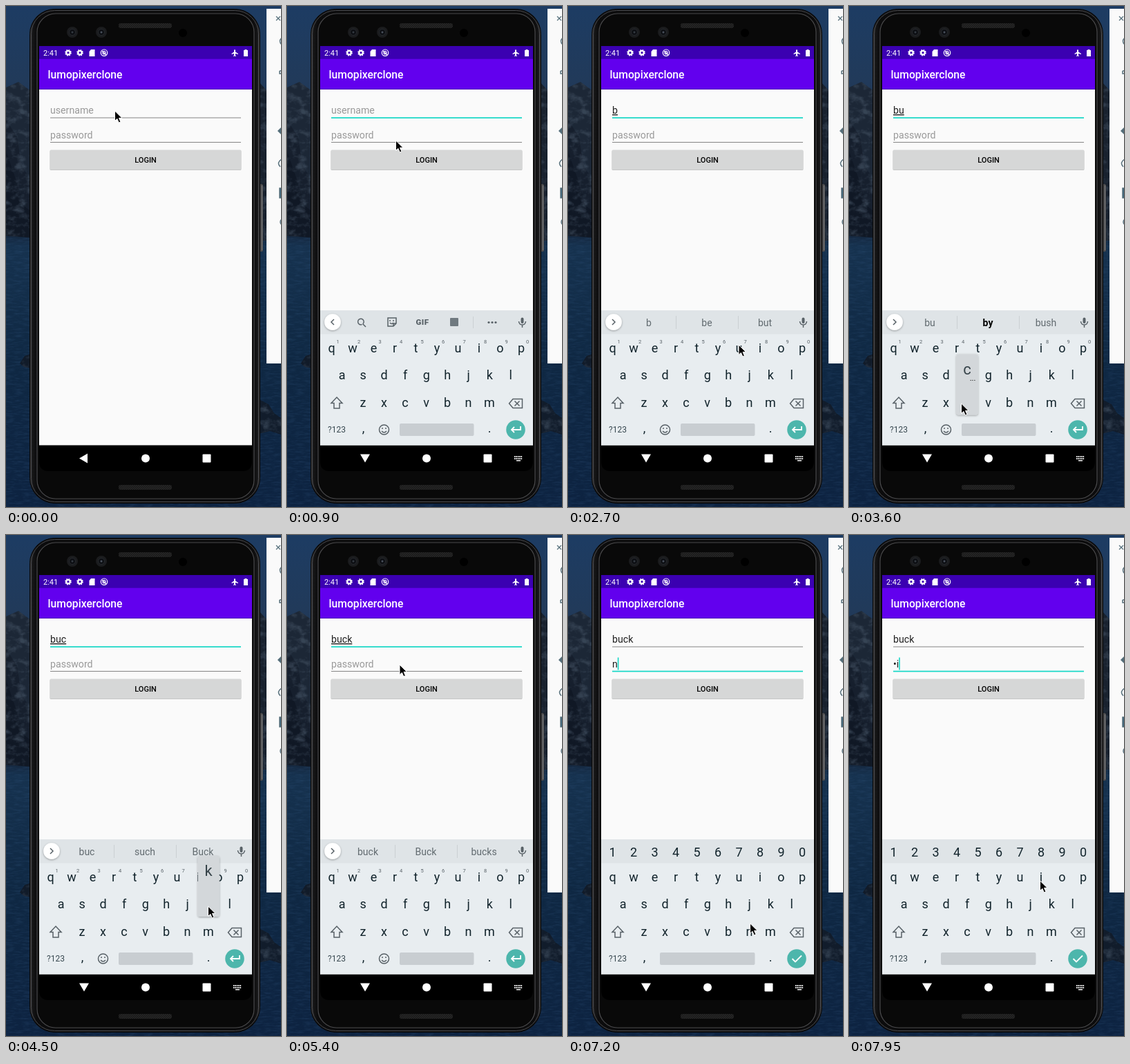
Write an HTML page that moves like this. It is 398 by 726 pixels and loops after 8000 ms.

```html
<!DOCTYPE html>
<html lang="en">
<head>
<meta charset="utf-8">
<title>Login form</title>
<style>
html, body { margin: 0; width: 100%; height: 100%; overflow: hidden; background: #14263f; }
svg { display: block; width: 100vw; height: 100vh; font-family: Roboto, sans-serif; }
.mid { text-anchor: middle; }
.key { font-size: 18px; fill: #12242c; text-anchor: middle; }
.field { font-size: 14.15px; }
.icon { fill: none; stroke: #586167; stroke-width: 1.5; }
</style>
</head>
<body>
<svg viewBox="0 0 398 726" preserveAspectRatio="none">
  <defs>
    <linearGradient id="sky" x2="0" y2="1">
      <stop stop-color="#1d3c63"/><stop offset=".15" stop-color="#213a5a"/>
      <stop offset=".45" stop-color="#15243a"/><stop offset=".48" stop-color="#16324f"/>
      <stop offset=".7" stop-color="#0f2843"/><stop offset="1" stop-color="#0d2341"/>
    </linearGradient>
    <linearGradient id="rim">
      <stop stop-color="#343436"/><stop offset=".012" stop-color="#161617"/>
      <stop offset=".03" stop-color="#0c0c0d"/><stop offset=".97" stop-color="#0c0c0d"/>
      <stop offset=".988" stop-color="#161617"/><stop offset="1" stop-color="#343436"/>
    </linearGradient>
    <pattern id="mesh" width="3" height="3" patternUnits="userSpaceOnUse">
      <rect width="3" height="3" fill="#262626"/><path d="M0 3L3 0" stroke="#151515"/>
    </pattern>
    <clipPath id="screen"><path d="M48 58H356V660Q356 674 342 674H62Q48 674 48 660Z"/></clipPath>
    <clipPath id="page"><path d="M48 121H356V636.400H48Z"/></clipPath>
    <filter id="shade" x="-30%" y="-30%" width="160%" height="160%">
      <feDropShadow dx="0" dy="1" stdDeviation="1.5" flood-opacity=".35"/>
    </filter>
    <filter id="rock" x="0" y="0" width="100%" height="100%" color-interpolation-filters="sRGB">
      <feTurbulence type="fractalNoise" baseFrequency=".07 .1" numOctaves="4" seed="4"/>
      <feColorMatrix values="0 0 0 0 .3  0 0 0 0 .36  0 0 0 0 .43  3 0 0 0 -1.4"/>
      <feComposite in2="SourceGraphic" operator="in"/>
    </filter>
    <filter id="waves" x="0" y="0" width="100%" height="100%" color-interpolation-filters="sRGB">
      <feTurbulence type="fractalNoise" baseFrequency=".08 .4" numOctaves="3" seed="9"/>
      <feColorMatrix values="0 0 0 0 .2  0 0 0 0 .34  0 0 0 0 .5  2 0 0 0 -.85"/>
    </filter>
    <g id="gear" fill="none" stroke="#fff">
      <circle r="2.7" stroke-width="2.2"/><circle r="4" stroke-width="1.6" stroke-dasharray="1.8 1.34"/>
    </g>
    <g id="land">
      <path d="M0 118L18 110 40 126V334L0 330Z" fill="#1c2736"/>
      <path d="M0 165L16 190 22 230 40 260V334L0 322Z" fill="#161f2d"/>
      <path d="M0 210L12 245 26 290 40 300V336L0 333Z" fill="#101825"/>
      <path d="M20 518L27 507 40 503V526L26 523Z" fill="#111b29"/>
      <path d="M366 110L377 122V340H366Z" fill="#18212e"/>
      <path d="M366 570L380 577 388 590 398 597V621L382 616 366 620Z" fill="#111c2b"/>
    </g>
  </defs>

  <rect width="398" height="726" fill="url(#sky)"/>
  <rect y="336" width="398" height="390" filter="url(#waves)" opacity=".3"/>
  <use href="#land"/>
  <use href="#land" filter="url(#rock)" opacity=".55"/>

  <rect x="367" y="258" width="5" height="98" rx="2" fill="#4a4a4c"/>
  <path d="M370.500 260V354" stroke="#77797c"/>
  <rect x="34.5" y="4.5" width="333" height="716" rx="36" fill="url(#rim)" stroke="#0a0a0a"/>
  <rect x="36.500" y="6.5" width="329" height="712" rx="34" fill="none" stroke="#4b4b4e"/>
  <rect x="45" y="11" width="314" height="703" rx="27" fill="#090909" stroke="#4a4a4c" stroke-width="1.2"/>
  <rect x="163" y="25" width="77" height="7" rx="3" fill="url(#mesh)"/>
  <rect x="163" y="694" width="77" height="7" rx="3" fill="url(#mesh)"/>
  <g fill="#1b1c1e">
    <circle cx="96" cy="38" r="8"/><circle cx="138" cy="38" r="8"/>
    <g fill="#0d0f13" stroke="#26292e"><circle cx="96" cy="38" r="4.5"/><circle cx="138" cy="38" r="4.5"/></g>
    <circle cx="256" cy="39" r="6" fill="#000"/>
    <circle cx="138" cy="38" r="1.5" fill="#49505c"/><circle cx="96" cy="38" r="1.5" fill="#343a42"/>
  </g>

  <path d="M377 4H398V518H377Z" fill="#fafafa"/>
  <g fill="none" stroke="#546e7a" stroke-width="1.5">
    <path d="M391 15L397 21M397 15L391 21" stroke-width="1.2"/>
    <path d="M399 46Q394 51 399 56M396 94H399M396 94V98H399M399 222Q391 227 397 233"/>
    <path d="M394 181L399 176V186Z" fill="#546e7a"/>
    <rect x="396" y="264" width="8" height="14" fill="#40677d"/>
    <circle cx="402" cy="313" r="5"/>
  </g>

  <g clip-path="url(#screen)">
    <path d="M48 121H356V637H48Z" fill="#fafafa"/>
    <path d="M48 76H356V120.700H48Z" fill="#6200ee"/>
    <path d="M48 58H356V76.800H48Z" fill="#3b00b1"/>
    <path d="M48 636.400H356V674H48Z"/>
    <g fill="#fff">
      <text id="clock" x="54" y="72" font-size="11"></text>
      <use href="#gear" x="90" y="67.700"/><use href="#gear" x="107" y="67.700"/>
      <path d="M123 63H128.500V73H120.500V66Z"/>
      <g fill="none" stroke="#fff" stroke-width="1.2"><circle cx="142" cy="67.700" r="4.7"/><circle cx="142" cy="67.700" r="2"/><path d="M139 65L145 71"/></g>
      <path d="M331 63Q332 63 332 64.500V66.500L336 69V70L332 69V71.500L333 72.500V73L331 72.500 329 73V72.500L330 71.500V69L326.500 70V69L330 66.500V64.500Q330 63 331 63Z"/>
      <path d="M345.500 63H348.500V64H350V73H344V64H345.500Z"/>
      <text x="60.500" y="105" font-size="15.7" font-weight="500">lumopixerclone</text>
      <circle cx="202" cy="655.500" r="6"/><rect x="284.500" y="649.500" width="12" height="12" rx="1"/>
    </g>
    <rect x="63.500" y="209.500" width="277" height="28.500" rx="1.500" fill="#c6c7c7"/>
    <rect x="63.500" y="208.500" width="277" height="28.500" rx="1.500" fill="#d6d7d7"/>
    <text class="mid" x="202" y="227" font-size="11" font-weight="500">LOGIN</text>
    <g id="live"></g>
  </g>
  <path id="pointer" d="M0 0V14.500L3.400 11.400 5.800 17 8.400 15.900 6 10.400H10.500Z" stroke="#fff"/>
</svg>

<script>
const LOOP = 8000, STEP = 150;
const $ = id => document.getElementById(id);
const pen = document.createElement('canvas').getContext('2d');

// time, x, y of the pointer tip
const path = [
  [0, 157.5, 152], [600, 157.5, 152], [900, 157.5, 195], [1200, 157.5, 195], [1750, 229, 577],
  [2100, 229, 577], [2650, 247, 491], [3000, 247, 491], [3300, 162.5, 576], [3750, 162.5, 576],
  [4300, 292.5, 538], [4700, 292.5, 538], [5400, 163, 188], [5850, 163, 188], [6150, 162.5, 282],
  [6800, 260, 580], [7050, 260, 580], [7550, 276.5, 501], [LOOP, 276.5, 501]
];
// time, username, suggestions
const typed = [
  [0, ''], [1950, 'b', 'b', 'be', 'but'], [3000, 'bu', 'bu', 'by', 'bush'],
  [3750, 'buc', 'buc', 'such', 'Buck'], [4650, 'buck', 'buck', 'Buck', 'bucks']
];
const secret = [[0, ''], [7050, 'n'], [7800, '•i']];
const presses = [['b', 1800, 1950], ['u', 2850, 3000], ['c', 3450, 3750],
  ['k', 4500, 4650], ['n', 6900, 7050], ['i', 7650, 7800]];
const FOCUS = 300, NEXT = 5850;

const keys = {};
[['qwertyuiop', 64.5, 501.5], ['asdfghjkl', 79.7, 541], ['zxcvbnm', 110, 580.5]].forEach(([row, x, y]) =>
  [...row].forEach((c, i) => keys[c] = [x + i * 30.5, y]));

const latest = (list, t) => list.filter(e => e[0] <= t).pop();
const text = (x, y, s, attrs = 'class="key"') => `<text x="${x}" y="${y}" ${attrs}>${s}</text>`;
const rect = (x, y, w, h, fill, more = '') =>
  `<rect x="${x}" y="${y}" width="${w}" height="${h}" fill="${fill}" ${more}/>`;
const icon = (d, more = '') => `<path class="icon" d="${d}" ${more}/>`;
const digits = draw => [...'1234567890'].map((d, i) => draw(d, 64.5 + i * 30.5)).join('');

function field(y, value, hint, focused, t, since) {
  let s = text(64, y, value || hint,
    `class="field" fill="${value ? '#212121' : '#999'}" ${value && focused && hint == 'username' ? 'text-decoration="underline"' : ''}`);
  s += focused ? rect(64, y + 5.2, 276, 1.7, '#14d7c6') : rect(64, y + 5.5, 276, 1, '#858585');
  if (focused && (t - since) % 1000 < 500) {
    pen.font = '14.15px Roboto, sans-serif';
    s += rect(64 + pen.measureText(value).width, y - 14, 1.6, 18, '#14d7c6');
  }
  return s;
}

function toolbar([, value, ...words]) {
  let s = '<circle cx="66" cy="458" r="11.800" fill="#fff" filter="url(#shade)"/>' +
    icon(value ? 'M64 454L68 458 64 462' : 'M68 454L64 458 68 462') +
    rect(338.5, 451.5, 4, 8.5, '#586167', 'rx="2"') +
    icon('M335.500 457Q336 462 340.500 462T345.500 457M340.500 462V466', 'stroke-width="1.2"');
  if (value) {
    words.forEach((w, i) => s += text(117 + 84 * i, 464, w, 'class="mid" font-size="14" ' +
      (value == 'bu' && i == 1 ? 'font-weight="700"' : 'fill="#626b70"')));
    return s + rect(156, 449, 1, 19, '#cbd0d3') + rect(246, 449, 1, 19, '#cbd0d3');
  }
  return s + icon('M110 460.500A4.300 4.300 0 1 0 108.500 461.500M109.500 460.500L114 465') +
    icon('M146 452H158V460L154 464H146ZM158 460H154V464M149 455V457M154 455V457M149 459Q151.500 462 154 459') +
    text(196, 462, 'GIF', 'class="mid" font-size="11.500" font-weight="900" fill="#586167" letter-spacing=".5"') +
    rect(236, 452, 12, 12, '#707a80', 'rx="1"') + rect(269, 450, 1, 17, '#cbd0d3') +
    [292, 297, 302].map(x => `<circle cx="${x}" cy="458.500" r="1.600" fill="#586167"/>`).join('');
}

function keyboard(t, entry) {
  const pass = t >= NEXT;
  let s = rect(48, 441, 308, 196, '#e8edf0') + rect(48, 441, 308, 34.5, '#dfe4e7');
  s += pass ? digits((d, x) => text(x, 465.5, d)) :
    toolbar(entry) + digits((d, x) => text(x + 9, 489, d, 'class="mid" font-size="7.500" fill="#586167"'));
  for (const c in keys) s += text(...keys[c], c);
  s += icon('M72 567L80 575.500H76V583H68V575.500H64Z') +
    icon('M327 569.500H340.500V582.500H327L321.500 576ZM329.500 572.500L336.500 579.500M336.500 572.500L329.500 579.500') +
    text(72, 618, '?123', 'class="mid" font-size="12" fill="#37474f"') +
    text(110.5, 618, ',') + text(293, 618, '.') +
    rect(pass ? 133 : 163, 605, pass ? 137.5 : 107.5, 18, '#c8cdd1', 'rx="2"') +
    '<circle cx="331" cy="614" r="13.800" fill="#4db6ac"/>' +
    icon(pass ? 'M324.500 614L329 618.500 338 609.500' : 'M338 609V614H325M329 610L325 614 329 618', 'style="stroke:#fff;stroke-width:1.800"');
  if (!pass) s += '<circle class="icon" cx="140.500" cy="614" r="7"/>' +
    icon('M137 616Q140.500 620 144 616M138 611V613M143 611V613');
  return s;
}

function popup(t) {
  const hit = presses.find(([, from, to]) => t >= from && t < to);
  if (!hit) return '';
  const c = hit[0], [x, y] = keys[c];
  return rect(x - 15.5, y - 76, 31, 88, '#d3d7da', 'rx="3" filter="url(#shade)"') +
    text(x, y - 47, c, 'class="key" style="font-size:22px;fill:#37444a"') +
    (c == 'k' || c == 'b' ? '' : text(x + 8, y - 37.5, '...', 'class="mid" font-size="11"'));
}

function draw(t) {
  const user = latest(typed, t), pass = latest(secret, t);
  const rise = Math.min(1, Math.max(0, (t - 350) / 350));
  const drop = 196 * (1 - rise) ** 2;
  let s = field(156, user[1], 'username', t >= FOCUS && t < NEXT, t, Math.max(FOCUS, user[0])) +
    field(191.5, pass[1], 'password', t >= NEXT, t, Math.max(NEXT, pass[0]));
  if (rise) s += `<g clip-path="url(#page)"><g transform="translate(0 ${drop})">${keyboard(t, user)}</g></g>` + popup(t);
  s += `<path fill="#fff" d="${rise ? 'M106 649.500H120L113 661.500Z' : 'M118 648.500V662.500L106 655.500Z'}"/>`;
  if (rise) s += '<path d="M329 653H341M329 656H341" stroke="#fff" stroke-width="2" stroke-dasharray="1.500 .9"/>' +
    rect(332, 658, 6, 1.5, '#fff');
  $('live').innerHTML = s;
  $('clock').textContent = t >= 7650 ? '2:42' : '2:41';

  const i = path.findIndex(p => p[0] > t), [t0, x0, y0] = path[i - 1], [t1, x1, y1] = path[i];
  const k = (t - t0) / (t1 - t0), e = k * k * (3 - 2 * k);
  $('pointer').setAttribute('transform', `translate(${x0 + (x1 - x0) * e} ${y0 + (y1 - y0) * e})`);
}

let shown = -1;
const start = performance.now();
function tick() {
  const t = Math.floor((performance.now() - start) % LOOP / STEP) * STEP;
  if (t != shown) draw(shown = t);
  requestAnimationFrame(tick);
}
tick();
</script>
</body>
</html>
```
